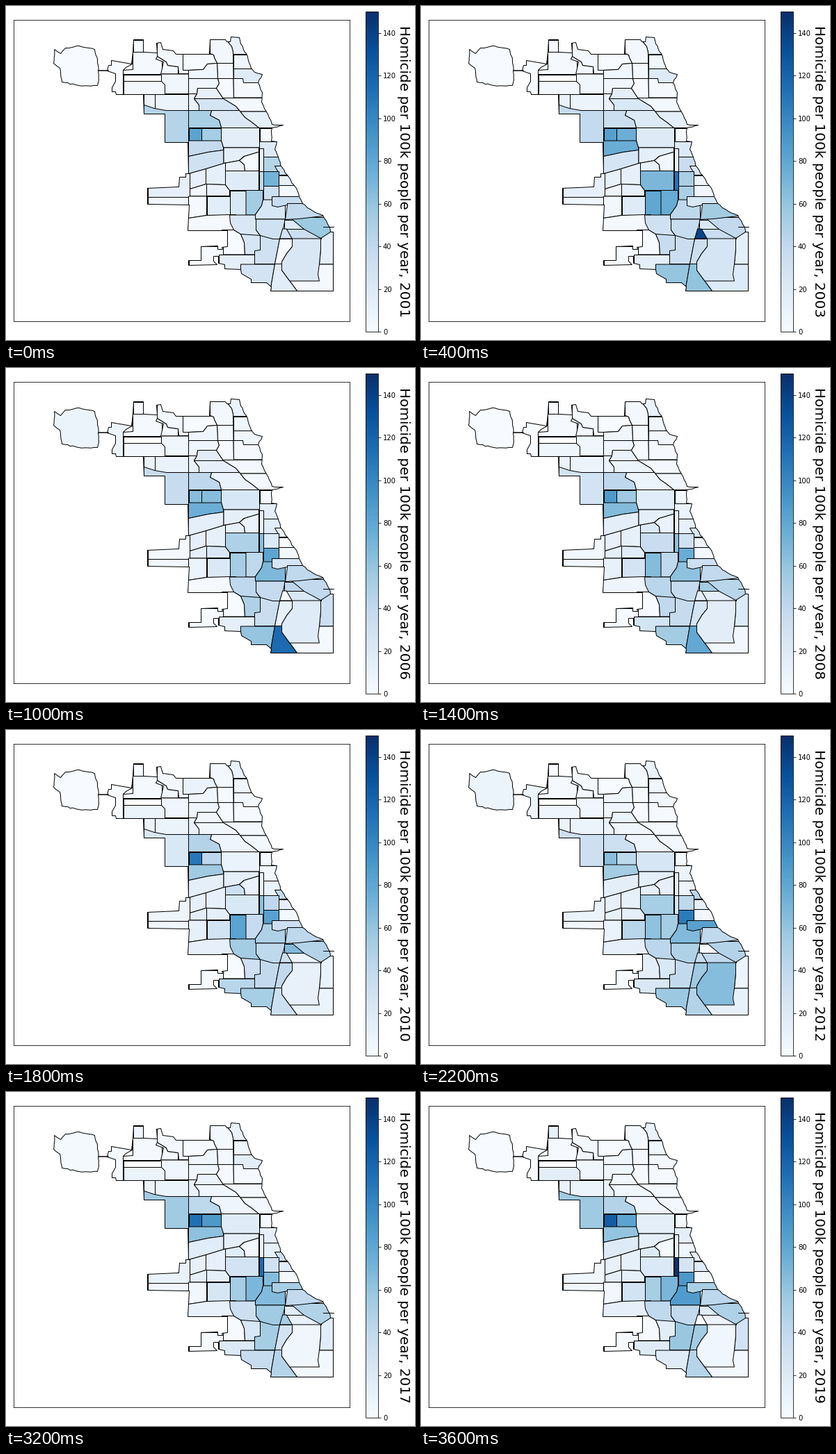
A matplotlib script for the animation above (3800 ms loop, 588x481 px).

```python
import matplotlib as mpl
import matplotlib.pyplot as plt
import numpy as np
from matplotlib.animation import FuncAnimation
from matplotlib.cm import ScalarMappable
from matplotlib.collections import PolyCollection
from matplotlib.colors import Normalize
from matplotlib.patches import PathPatch
from matplotlib.path import Path

W, H = 588, 481
YEARS = np.arange(2001, 2020)
rng = np.random.default_rng(7)

shapes, rates = [], []


# A border is a constant or a bent line of (position, offset) points.
def at(border, t):
    return border if np.isscalar(border) else np.interp(t, *zip(*border))


def corner(vertical, horizontal):
    y = 200
    for _ in range(20):
        x = at(vertical, y)
        y = at(horizontal, x)
    return x, y


def side(border, a, b):
    knots = [] if np.isscalar(border) else [t for t, _ in border if min(a, b) < t < max(a, b)]
    return [(t, at(border, t)) for t in [a, *sorted(knots, reverse=b < a)]]


def block(west, east, north, south, rate):
    """Add a district between four borders; rate is fixed or keyed by year - 2000."""
    nw, ne = corner(west, north), corner(east, north)
    sw, se = corner(west, south), corner(east, south)
    flip = lambda points: [(x, y) for y, x in points]
    shapes.append(side(north, nw[0], ne[0]) + flip(side(east, ne[1], se[1]))
                  + side(south, se[0], sw[0]) + flip(side(west, sw[1], nw[1])))
    if isinstance(rate, dict):
        rate = np.interp(YEARS - 2000, list(rate), list(rate.values()))
    rates.append(rate * rng.uniform(0.93, 1.07, len(YEARS)))


def ragged(points, step=4, size=0.8):
    """Roughen a line with small seeded bumps."""
    out = []
    for p, q in zip(points, points[1:]):
        n = max(1, int(np.hypot(q[0] - p[0], q[1] - p[1]) / step))
        out.append(p)
        out += [tuple(np.add(p, np.subtract(q, p) * k / n) + rng.uniform(-size, size, 2))
                for k in range(1, n)]
    return out + [points[-1]]


# City limits
north_edge = [(180, 83), (182, 66), (183, 48), (197, 48), (197, 66), (217, 67), (216, 53),
              (222, 52), (225, 62), (240, 64), (244, 69), (292, 69), (293, 48), (315, 48),
              (317, 51), (322, 51), (323, 44)]
shore = [(335, 45), (337, 54), (345, 68), (352, 89), (357, 95), (368, 98), (362, 110),
         (368, 124), (367, 138), (374, 152), (382, 170), (398, 171), (382, 175), (381, 194),
         (389, 195), (386, 206), (391, 217), (394, 229), (404, 243), (413, 257), (417, 262),
         (421, 274), (426, 284), (441, 295), (455, 301), (464, 317), (466, 325)]
south_edge = [(470, 325), (470, 410), (380, 410), (381, 404), (374, 398), (352, 398),
              (352, 393), (338, 385), (337, 379), (314, 378), (314, 372), (305, 370),
              (305, 360), (298, 360), (298, 367), (303, 372), (262, 373), (262, 366),
              (280, 366), (280, 346), (304, 345), (304, 350), (311, 350), (310, 347),
              (318, 346), (318, 323), (261, 323)]
west_edge = [(263, 286), (203, 285), (203, 262), (248, 260), (249, 246), (258, 246),
             (258, 241), (262, 241), (261, 196), (228, 196), (228, 155), (198, 155),
             (197, 127), (158, 127), (157, 123), (152, 123), (152, 117), (157, 108),
             (157, 97), (145, 93), (147, 85), (151, 85), (151, 78), (180, 83)]
airfield = [(69, 62), (78, 68), (85, 60), (105, 57), (127, 62), (131, 78), (133, 106),
            (131, 114), (104, 114), (80, 109), (77, 89), (68, 82), (69, 62)]
city = north_edge + ragged(shore) + south_edge + west_edge
limits = Path.make_compound_path(Path(city, closed=True), Path(ragged(airfield), closed=True))

# Shared borders running north-south, as (y, x)
ridge = [(48, 316), (58, 324), (66, 326), (132, 327)]
river = [(68, 293), (70, 298), (74, 299), (82, 303), (104, 304), (111, 306), (118, 302),
         (133, 312), (144, 330), (150, 335), (160, 343), (167, 353), (175, 363)]
kost = [(126, 274), (133, 270), (142, 277)]
park = [(150, 295), (157, 293), (164, 306), (175, 309)]
mill = [(193, 309), (203, 312)]
bend = [(216, 342), (222, 335), (228, 342), (237, 343)]
yards = [(257, 315), (265, 321)]
track = [(279, 369), (287, 367), (297, 360), (300, 358)]
hill = [(328, 337), (340, 342), (357, 343)]
pull = [(335, 393), (371, 386), (400, 381), (410, 380)]
deer = [(346, 411), (356, 403), (368, 396), (380, 396), (395, 407), (410, 418)]
east = [(350, 452), (371, 450), (386, 448), (396, 450)]
slope = [(306, 401), (320, 398), (335, 393)]

# Shared borders running west-east, as (x, y)
glen = [(217, 72), (230, 80), (232, 85), (247, 87), (248, 97)]
foster = [(262, 92), (283, 91), (289, 83), (303, 82)]
belt = [(274, 126), (275, 118)]
view = [(340, 104), (341, 110)]
lawn = [(262, 216), (290, 210), (312, 207)]
canal = [(262, 241), (287, 234), (313, 226), (335, 222), (342, 216), (362, 210)]
rail = [(264, 263), (287, 256), (315, 257)]
marq = [(262, 305), (288, 301), (321, 300)]
vine = [(327, 322), (337, 328), (365, 330)]

# North-west
airport = {5: 0, 6: 9, 7: 0, 11: 0, 12: 9, 15: 8, 18: 0}
block(60, 140, 50, 120, airport)
block(182, 197, 48, 66, {15: 0, 19: 14})
block([(91, 182), (92, 168)], 224, 66, 98, 2)
block(145, [(83, 181), (88, 172), (92, 168)], 78, 127, airport)
block([(72, 217), (76, 215), (80, 226), (98, 222)], 247, glen, 97.5, 4)
block(217, [(84, 254), (92, 262)], 50, glen, 3)
block(168, 228, 107, 126.5, {6: 3, 10: 9, 15: 3, 19: 14})
block([(107, 222), (113, 228)], 262, 97.5, 126, 6)
block(168, 222, 98, 107, np.nan)
block(197, 213, 126.5, 147, 9)
block(213, 262, 126, 150, 9)
block(198, 262, [(198, 142), (213, 147), (230, 150)], 196, {1: 44, 6: 34, 10: 24, 15: 50, 19: 55})

# North
block(ridge, 370, 40, 69, 10)
block(ridge, 370, 69, 89.5, 6)
block(ridge, 370, 89.5, 110, {3: 18, 6: 6, 12: 4, 15: 24, 19: 4})
block(river, ridge, 40, 82, 4)
block(river, ridge, 82, 104, 3)
block(254, river, 69, foster, {9: 0, 10: 10, 11: 0})
block(262, river, foster, 104, 6)
block(262, river, 104, belt, 7)
block(262, kost, belt, 150, 11)
block(kost, river, belt, 133, {1: 12, 6: 16, 10: 4, 15: 15, 19: 5})
block(river, ridge, 104, 132, 1)
block(ridge, 370, view, 131.5, 2)
block(river, 376, 132, 151.5, 3)
block(river, 400, 151.5, 175, {3: 14, 6: 4})
block(kost, river, 133, 150, {3: 24, 6: 12, 10: 6})
block(park, river, 150, 175, {3: 21, 6: 10, 10: 7})

# West
block(262, park, 150, 175, {1: 52, 3: 32, 10: 48, 12: 30, 15: 30, 19: 48})
block(262, 280, 175, 193.5, {3: 82, 6: 66, 10: 104, 12: 62, 19: 130})
block(280, 309, 175, 193.5, {1: 56, 3: 80, 10: 45, 12: 40, 15: 84})
block(262, mill, 193.5, lawn, {1: 36, 3: 80, 12: 52, 15: 64})
block(262, 312.5, lawn, canal, {3: 28, 6: 14, 19: 18})
block(mill, 364, 175, 203.5, {1: 16, 6: 24, 10: 10, 12: 24, 19: 16})
block(312.5, 363, 203.5, canal, 14)
block(313, bend, canal, 237, {6: 12, 10: 30, 12: 14, 19: 20})
block(bend, 363, canal, 237, {1: 1, 6: 9, 12: 12, 19: 3})

# Centre
block(364, 400, 175, 194.5, 3)
block(363, 400, 194.5, 216.5, {3: 22, 10: 4, 15: 14})
block(363, 369, 204, 237, 13)
block(369, 400, 216.5, 237, {1: 48, 6: 16, 12: 8, 15: 18, 19: 6})
block([(230, 386), (237, 390), (243, 391)], 410, 230, 243, {1: 32, 6: 10, 10: 36, 15: 52, 19: 12})
block(369, 391, 237, 258, {1: 68, 6: 20, 10: 43, 19: 24})
block(391, 420, 243, 257.5, {1: 12, 6: 0, 10: 12, 15: 18})
block(363, 369, 237, 265, {1: 40, 3: 112, 6: 66, 10: 64, 12: 26, 15: 108, 19: 138})
block(369, 391, 258, 278.5, {1: 34, 6: 80, 10: 80, 12: 112, 15: 40, 19: 94})
block(391, 425, 257.5, 273.5, 4)

# South-west
block(203, 264, 240, 274.5, {3: 12, 6: 2, 15: 14, 19: 6})
block(203, 264, 274.5, 286, 5)
block(264, 287, canal, rail, 12)
block(287, 315, canal, rail, 13)
block(264, 288, rail, 273.5, {1: 3, 6: 14})
block(288, yards, rail, 273, {3: 12, 6: 22, 10: 14})
block(yards, 363, 237, 265, {1: 18, 3: 70, 10: 24, 12: 54, 19: 20})
block(262, 288, 273.5, marq, {1: 2, 10: 14, 15: 4})
block(288, 321, 273, 300.5, {1: 16, 10: 28, 12: 46, 15: 20, 19: 28})
block(321, 344.5, 265, 300.5, {1: 24, 3: 76, 6: 56, 10: 82, 12: 58, 15: 50})
block(344.5, track, 265, 300.5, {1: 56, 3: 76, 6: 40, 10: 38, 15: 76, 19: 66})
block(261, 330, marq, 323, {6: 2, 10: 12, 19: 12})
block(310, hill, vine, 357.5, {10: 0, 12: 15, 15: 1})
block(hill, 365, 328, 357.5, {1: 24, 6: 50, 12: 22, 15: 32, 19: 16})
block(262, 311, 345, 373, 1)
block(305, 357, 357.5, 380, {6: 14, 10: 42, 12: 24, 19: 18})
block([(351, 365), (352, 357)], pull, 329, 371, {1: 32, 15: 40, 19: 62})
block([(300, 321), (312, 322), (322, 327)], [(322, 359), (330, 365)], 300.5, vine,
      {1: 22, 10: 52, 15: 26, 19: 42})
block(337, pull, 371.5, 410, {1: 28, 3: 60, 15: 52, 19: 18})

# South-east
block(track, slope, 278.5, 306.5, {1: 24, 6: 70, 10: 46, 12: 66, 15: 54, 19: 82})
block(382, 430, 274, [(382, 287), (390, 289), (404, 286), (426, 284)],
      {1: 36, 3: 22, 10: 34, 12: 82, 15: 50})
block(359, slope, 306.5, [(359, 322), (365, 330), (383, 335)], {1: 30, 12: 46, 15: 72, 19: 40})
block(east, 470, 318, 371.5, {3: 14, 6: 32, 10: 10, 15: 4, 19: 28})
block(399, 452, 320, 334.5, {3: 34, 10: 8, 12: 42, 15: 16, 19: 8})
block(399, 428, 307, 320, {3: 20, 10: 70, 12: 1, 15: 18})
block([(321, 397), (335, 393)], [(321, 403), (335, 411)], 320.5, 334.5,
      {1: 28, 3: 138, 6: 2, 10: 34, 12: 34, 15: 106, 19: 0})
block(410, 470, 304, [(410, 306), (428, 321), (452, 334), (466, 325)], {1: 58, 3: 38, 19: 50})
block([(286, 404), (307, 401)], 456, 284, [(401, 307), (420, 306), (455, 302)],
      {1: 40, 3: 58, 6: 38, 19: 42})
shapes[-1], shapes[-2] = shapes[-1], shapes[-2]
rates[-1], rates[-2] = rates[-1], rates[-2]
block(pull, deer, 335, 371, {1: 1, 3: 34, 6: 12, 12: 54, 15: 2, 19: 56})
block(deer, 470, 371.5, 410, {1: 2, 3: 20, 6: 2, 12: 12, 15: 3})
block(pull, deer, 371, 410, {1: 16, 6: 124, 10: 32, 12: 46})
block(deer, east, 334.5, 395.5, {3: 24, 10: 12, 12: 66, 15: 6})

rates = np.array(rates)


def pixel_axes(left, top, right, bottom):
    return fig.add_axes([left / W, 1 - bottom / H, (right - left) / W, (bottom - top) / H])


plt.rcParams["font.family"] = "DejaVu Sans"
fig = plt.figure(figsize=(W / 72, H / 72), dpi=72, facecolor="white")
norm = Normalize(0, 150)
blues = mpl.colormaps["Blues"].with_extremes(bad="white")

ax = pixel_axes(11, 20, 494, 454)
ax.set(xlim=(10.5, 493.5), ylim=(453.5, 19.5), xticks=[], yticks=[])
border = ax.add_patch(PathPatch(limits, fc="none", ec="black", lw=1, zorder=3))
districts = PolyCollection(shapes, cmap=blues, norm=norm, edgecolor="black", linewidth=1)
ax.add_collection(districts, autolim=False)
districts.set_clip_path(border)
ax.plot([132, 146], [92.5, 92.5], color="black", lw=1.5)
ax.plot([455, 470], [317, 317], color="black", lw=1)

cax = pixel_axes(517, 8, 535, 469)
fig.colorbar(ScalarMappable(norm, blues), cax=cax, ticks=range(0, 141, 20))
cax.tick_params(labelsize=10)

label = fig.text(566.5 / W, 1 - 238 / H, "", size=20, rotation=270,
                 rotation_mode="anchor", ha="center", va="baseline")


def draw(i):
    districts.set_array(rates[:, i])
    label.set_text(f"Homicide per 100k people per year, {YEARS[i]}")
    return districts, label


anim = FuncAnimation(fig, draw, frames=len(YEARS), interval=200, repeat=True, repeat_delay=0)
plt.show()
```
